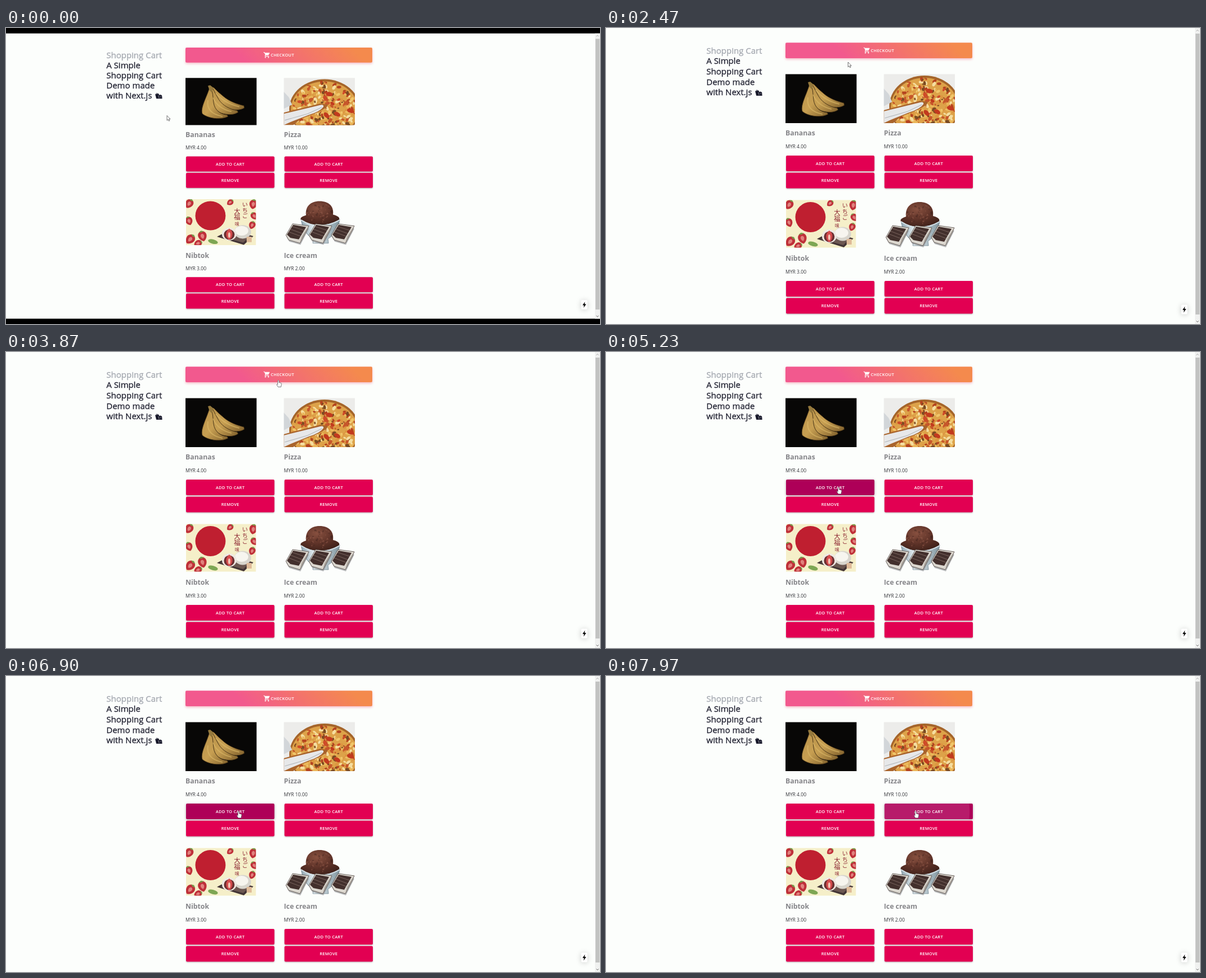
An HTML page that plays this animation: 1059x529 px, repeating every 8000 ms.

```html
<!DOCTYPE html>
<html lang="en">
<head>
<meta charset="utf-8">
<title>Shopping Cart</title>
<style>
  html, body { margin: 0; width: 100%; height: 100%; overflow: hidden; background: #000; }
  svg { display: block; }
  #stage { width: 100%; height: 100%; }
  text { font-family: "Open Sans", "Noto Sans", sans-serif; }
  .heading { font-size: 15px; stroke-width: .3px; }
  .name { font-size: 12.3px; font-weight: 700; fill: #858589; }
  .price { font-size: 8.6px; fill: #34343a; }
  .label { font-size: 7.55px; font-weight: 600; letter-spacing: .02857em; fill: #fff; }
  .flavour { font-family: "Noto Sans CJK JP", "Noto Sans CJK", sans-serif; font-weight: 500; fill: #8d2632; text-anchor: middle; }
</style>
</head>
<body>
<svg id="stage" viewBox="0 0 1059 529" preserveAspectRatio="none">
  <defs>
    <linearGradient id="checkoutFill" gradientUnits="userSpaceOnUse" x1="396" y1="130" x2="577" y2="-50">
      <stop offset=".3" stop-color="#f2598e"/><stop offset=".9" stop-color="#f48a4d"/>
    </linearGradient>
    <linearGradient id="bananaFill" x1="0" y1="0" x2="1" y2="1">
      <stop offset="0" stop-color="#b8924a"/><stop offset=".5" stop-color="#c79f52"/><stop offset="1" stop-color="#80602c"/>
    </linearGradient>
    <radialGradient id="scoopFill" cx=".42" cy=".3" r=".75">
      <stop offset="0" stop-color="#87503f"/><stop offset=".5" stop-color="#62352a"/><stop offset="1" stop-color="#3f211a"/>
    </radialGradient>
    <linearGradient id="bowlFill">
      <stop offset="0" stop-color="#8fa3ae"/><stop offset=".35" stop-color="#e8f2f6"/><stop offset="1" stop-color="#7f959f"/>
    </linearGradient>
  </defs>
  <g id="page"></g>
  <g id="cursor" stroke-linejoin="round"></g>
</svg>
<script>
const LOOP = 8000;
const $ = id => document.getElementById(id);
const clamp = v => Math.min(1, Math.max(0, v));
const mix = (a, b, k) => a + (b - a) * k;

// cubic-bezier(.4, 0, .2, 1)
function ease(x) {
  x = clamp(x);
  let lo = 0, hi = 1;
  for (let i = 0; i < 24; i++) {
    const u = (lo + hi) / 2;
    const at = 1.2 * u * (1 - u) ** 2 + .6 * u * u * (1 - u) + u ** 3;
    if (at < x) lo = u; else hi = u;
  }
  return lo * lo * (3 - 2 * lo);
}

function randomizer(seed) {
  return () => (seed = (seed * 16807) % 2147483647) / 2147483647;
}

const rect = (x, y, w, h, fill, more = '') =>
  `<rect x="${x}" y="${y}" width="${w}" height="${h}" fill="${fill}" ${more}/>`;
const ellipse = (x, y, rx, ry, fill, turn = 0, more = '') =>
  `<ellipse rx="${rx}" ry="${ry}" fill="${fill}" transform="translate(${x} ${y}) rotate(${turn})" ${more}/>`;
const path = (d, fill, more = '') => `<path d="${d}" fill="${fill}" ${more}/>`;
const text = (cls, x, y, content, more = '') =>
  `<text class="${cls}" x="${x}" y="${y}" ${more}>${content}</text>`;
const photo = (x, y, w, h, content) =>
  `<svg x="${x}" y="${y}" width="${w}" height="${h}" viewBox="${x} ${y} ${w} ${h}">${content}</svg>`;

// Scatters flat spots evenly over an ellipse.
function scatter(seed, count, cx, cy, rx, ry, size, tones, more = '') {
  const rnd = randomizer(seed);
  let spots = '';
  for (let i = 0; i < count; i++) {
    const a = rnd() * 6.283, d = Math.sqrt(rnd()), r = size * (.4 + rnd());
    spots += ellipse((cx + Math.cos(a) * d * rx).toFixed(1), (cy + Math.sin(a) * d * ry).toFixed(1),
      r.toFixed(1), (r * .6).toFixed(1), tones[i % tones.length], Math.floor(rnd() * 180), more);
  }
  return spots;
}

function bananas() {
  const edge = 'stroke="#3d2b12" stroke-width=".9"';
  return photo(320, 82.5, 126.7, 87.5, rect(320, 82, 127, 89, '#080706') +
    path('M367 101C368 118 380 133 394 139C406 143 418 143 425 138L424 134C412 131 398 126 388 117Q378 109 370 100Z', 'url(#bananaFill)', edge) +
    path('M365 102C360 122 370 142 384 148C396 152 408 151 414 146L412 143C400 141 386 134 379 122Q373 111 368 101Z', 'url(#bananaFill)', edge) +
    path('M363 100C358 118 346 138 350 149C360 158 384 161 396 154L394 151C383 150 372 143 370 128Q369 112 366 100Z', 'url(#bananaFill)', edge) +
    path('M360 97L364 96L370 101L367 109Q362 106 362 103Z', '#94783c') +
    path('M374 111Q390 130 416 136M369 119Q377 139 402 145M360 124Q356 148 386 154', 'none', 'stroke="#ddb968" stroke-width="2" opacity=".6"'));
}

function pizza() {
  const tones = ['#f0c66a', '#c6562a', '#eab75a', '#f5dea0', '#b4431f', '#dd9640', '#7a4a22'];
  return photo(495.5, 82.5, 126.5, 87.5, rect(495, 82, 128, 89, '#ececea') +
    ellipse(568, 140, 63, 55, '#a5652a') + ellipse(568, 141, 60, 52, '#dda249') +
    scatter(77, 330, 568, 140, 57, 49, 3.6, tones) +
    scatter(31, 9, 568, 130, 50, 38, 5, ['#c23a1e', '#cf4b28']) +
    path('M495 147L560 130L574 132L571 138L552 148L526 158L512 170H495Z', '#a9642c') +
    path('M495 149L556 134Q567 130 566 136Q560 145 540 151L508 164L495 170Z', '#e7e8e9') +
    path('M497 161L538 149L563 137', 'none', 'stroke="#b3b7ba" stroke-width="1.2"') +
    path('M495 108L504 118L510 132L495 140Z', '#d2d6d9'));
}

function berry(x, y, size, turn) {
  return `<g transform="translate(${x} ${y}) rotate(${turn}) scale(${size})">` +
    path('M0 9C-8 5 -9 -6 0 -7C9 -6 8 5 0 9Z', '#bf3039') +
    path('M0 5C-3 3 -4 -2 0 -3C4 -2 3 3 0 5Z', '#e0827e') +
    path('M-4 -6L0 -8L4 -6L0 -5Z', '#78994a') + '</g>';
}

function sweets() {
  const berries = [[327, 315, 1.1, 30], [326, 347, 1, -20], [329, 381, 1.2, 40], [350, 375, 1.2, -15], [343, 389, .9, 70],
    [441, 316, 1.1, 10], [442, 338, .9, -30], [400, 313, .8, 50], [439, 355, .9, 20]];
  return photo(321, 307.5, 124.5, 85, rect(321, 307, 125, 86, '#f5efc9') +
    berries.map(b => berry(...b)).join('') +
    ellipse(369, 386, 9, 4, '#7da653', 15) +
    path('M376 377L400 364L441 376L424 392Z', '#433536') + path('M383 377L401 367L435 376L423 388Z', '#6c5751') +
    ellipse(422, 368, 15, 12.5, '#d8d5cd') + ellipse(420, 366, 12, 9, '#f7f5ef') +
    ellipse(398, 372, 13, 12, '#eee9e3') + ellipse(398, 373, 9.5, 9.5, '#6c2f31') +
    path('M398 362C405 366 406 377 398 383C390 377 391 367 398 362Z', '#d44b4d') + ellipse(398, 374, 2, 5, '#f2c5b6') +
    rect(429, 377, 9, 10, '#dfbb99') +
    '<circle cx="364.5" cy="338" r="27" fill="#bf1f30"/>' +
    [...'いちご'].map((c, i) => text('flavour', 426, 321 + i * 10.5, c, 'font-size="10"')).join('') +
    [...'大福味'].map((c, i) => text('flavour', 412, 334 + i * 11, c, `font-size="${i < 2 ? 11.5 : 8}"`)).join(''));
}

function chocolate(x) {
  return `<g transform="translate(${x} 371)">` +
    path('M-19 6L-6 -13L21 -9L6 21L-14 15Z', '#8a8d8f', 'opacity=".6"') +
    path('M-20 3L-8 -18L21 -14L17 -5L5 18L-15 12Z', '#dcd8d0', 'stroke="#4b403c" stroke-width=".8"') +
    path('M-18 2L-7 -16L16 -12L3 11L-12 8Z', '#43302d') +
    path('M-15 -3L6 5M-12 -8L9 0M-9 -13L12 -6', 'none', 'stroke="#7a645d" stroke-width="1"') +
    path('M8 6L19 -12L16 -4L5 16Z', '#aaa39b') + '</g>';
}

function iceCream() {
  return path('M526 345Q529 371 548 381L547 389H575L574 381Q592 370 595 345Z', 'url(#bowlFill)', 'stroke="#748894" stroke-width=".8"') +
    path('M526 346C523 341 530 339 535 337C533 321 543 311 559 311C576 311 585 321 583 336C591 338 597 342 593 346Q578 355 558 355Q538 355 526 346Z', 'url(#scoopFill)') +
    scatter(19, 70, 559, 333, 23, 18, 1.6, ['#42231d', '#945c4b'], 'opacity=".5"') +
    path('M526 346Q558 367 595 346', 'none', 'stroke="#d7e4ea" stroke-width="2"') +
    [519, 560, 600].map(chocolate).join('');
}

const buttons = [];
function button(x, y, label) {
  const id = buttons.length, w = 157.5, h = 28;
  buttons.push({ x, y, w, h });
  return rect(x, y, w, h, '#e20052', `rx="2" id="face${id}"`) +
    `<svg x="${x}" y="${y}" width="${w}" height="${h}"><circle id="ripple${id}" fill="#fff" opacity="0"/></svg>` +
    text('label', x + w / 2, y + 16.7, label, 'text-anchor="middle"');
}

function product(x, dy, name, price) {
  return text('name', x, 192 + dy, name) + text('price', x, 215 + dy, 'MYR ' + price) +
    button(x + 1, 228 + dy, 'ADD TO CART') + button(x + 1, 258.4 + dy, 'REMOVE');
}

const headings = ['Shopping Cart', 'A Simple', 'Shopping Cart', 'Demo made', 'with Next.js'];
function heading(line, i) {
  const tone = i ? '#202131' : '#a4a8b0';
  return text('heading', 179, 45.7 + i * 18.65, line, `fill="${tone}" stroke="${tone}"`);
}

const CART = 'M7 18c-1.1 0-2 .9-2 2s.9 2 2 2 2-.9 2-2-.9-2-2-2zM1 2v2h2l3.6 7.6-1.35 2.4C4.5 15.4 5.5 17 7 17h12v-2H7.4l-.2-.4.9-1.6h7.45c.75 0 1.4-.4 1.75-1l3.6-6.5C21.3 4.8 20.8 4 20 4H5.2l-.9-2zm16 16c-1.1 0-2 .9-2 2s.9 2 2 2 2-.9 2-2-.9-2-2-2z';

$('page').innerHTML = rect(0, 0, 1059, 529, '#fcfefc') +
  headings.map(heading).join('') +
  path('M266 113L272 111.5L273 114L278 115L278.5 121H268Z', '#17182a') +
  path('M267 113Q269 109 271 112.5M274 115Q276 112 277 115.5', 'none', 'stroke="#17182a" stroke-width=".8"') +
  path('M272 115L273 120M275 117.5H277', 'none', 'stroke="#c9cad0" stroke-width=".7"') +
  rect(320, 26.3, 333, 27.7, 'url(#checkoutFill)', 'rx="2" style="filter:drop-shadow(0 2px 2px rgba(235,80,115,.4))"') +
  `<g transform="translate(458.7 33.6) scale(.54)">${path(CART, '#fff')}</g>` +
  text('label', 472, 42.9, 'CHECKOUT') +
  bananas() + pizza() + sweets() + iceCream() +
  product(320, 0, 'Bananas', '4.00') + product(495.5, 0, 'Pizza', '10.00') +
  product(320, 224, 'Nibtok', '3.00') + product(495.5, 224, 'Ice cream', '2.00') +
  rect(1025.5, 494.5, 11, 17, '#fff', 'rx="2" style="filter:drop-shadow(0 1px 5px rgba(0,0,0,.2))"') +
  path('M1032.3 497.5L1027.8 504H1030.6L1029.7 508.8L1034.4 502H1031.5Z', '#000') +
  rect(1050, 0, 9, 529, '#f0f1f0') + rect(1051, 10, 7.3, 502, '#c2c3c2') +
  path('M1052.5 5.5L1054.5 3.5L1056.5 5.5', 'none', 'stroke="#a2a2a2"') +
  path('M1052.5 523.5L1054.5 525.5L1056.5 523.5', 'none', 'stroke="#555"');

const ARROW = path('M0 0V8.7L2 6.9L3.4 9.8L4.8 9.1L3.5 6.3H6Z', '#fff', 'stroke="#3a3a3a" stroke-width=".7"');
const HAND = path('M-1.1 .8Q0 -.8 1.1 .8V4L4.8 5Q5.8 5.4 5.6 7L4.7 12H-.4L-3 7.8Q-2.6 6.3 -1.1 7.6Z', '#fff', 'stroke="#45454c" stroke-width=".7"');

// time, x, y
const route = [[0, 287, 156.5], [70, 287, 156.5], [600, -20, 100], [2150, 330, -16], [2470, 431.5, 61],
  [2570, 433, 63], [2630, 433, 63], [3130, 485.5, 50.5], [3880, 485.5, 50.5], [4330, 414.5, 241.8],
  [6900, 414.5, 241.8], [7110, 552, 241.8], [LOOP, 552, 241.8]];
const OFFSCREEN = [600, 2150];
const HOVER = [{ id: 0, from: 4270, to: 6960, click: 5230 }, { id: 2, from: 7030, to: 9999, click: 7600 }];

function pointer(t) {
  const i = Math.max(1, route.findIndex(p => p[0] > t));
  const [a, b] = [route[i - 1], route[i]];
  const k = clamp((t - a[0]) / (b[0] - a[0]));
  const s = k * k * (3 - 2 * k);
  return [mix(a[1], b[1], s), mix(a[2], b[2], s)];
}

const shadow = k => `drop-shadow(0 ${mix(1, 1.8, k)}px ${mix(1.2, 2.2, k)}px rgba(40,0,20,.33))`;
buttons.forEach((b, id) => $('face' + id).style.filter = shadow(0));

function drawButton({ id, from, to, click }, t) {
  const b = buttons[id], face = $('face' + id), ripple = $('ripple' + id);
  const k = ease((t - from) / 250) - ease((t - to) / 250);
  face.setAttribute('fill', `rgb(${mix(226, 174, k)},0,${mix(82, 88, k)})`);
  face.style.filter = shadow(k);
  const [px, py] = pointer(click), x = px - b.x, y = py - b.y;
  const radius = Math.hypot(Math.max(x, b.w - x) + 1, Math.max(y, b.h - y) + 1);
  const grow = ease((t - click) / 550), fade = ease((t - click - 420) / 350);
  ripple.setAttribute('cx', x);
  ripple.setAttribute('cy', y);
  ripple.setAttribute('r', radius * grow);
  ripple.setAttribute('opacity', t < click ? 0 : mix(.05, .11, grow) * (1 - fade));
}

function render(t) {
  $('page').setAttribute('transform', t < 1800 ? 'translate(0 9.7) scale(1 .9637)' : '');
  HOVER.forEach(h => drawButton(h, t));
  const [x, y] = pointer(t);
  const inside = b => x >= b.x && x <= b.x + b.w && y >= b.y && y <= b.y + b.h;
  const over = t > 1800 && [...buttons, { x: 320, y: 26, w: 333, h: 28 }].some(inside);
  const cursor = $('cursor'), shape = over ? 'hand' : 'arrow';
  if (cursor.dataset.shape !== shape) {
    cursor.dataset.shape = shape;
    cursor.innerHTML = over ? HAND : ARROW;
  }
  cursor.setAttribute('transform', `translate(${x} ${y})`);
  cursor.setAttribute('visibility', t > OFFSCREEN[0] && t < OFFSCREEN[1] ? 'hidden' : 'visible');
}

const start = performance.now();
function tick() {
  render((performance.now() - start) % LOOP);
  requestAnimationFrame(tick);
}
tick();
</script>
</body>
</html>
```
